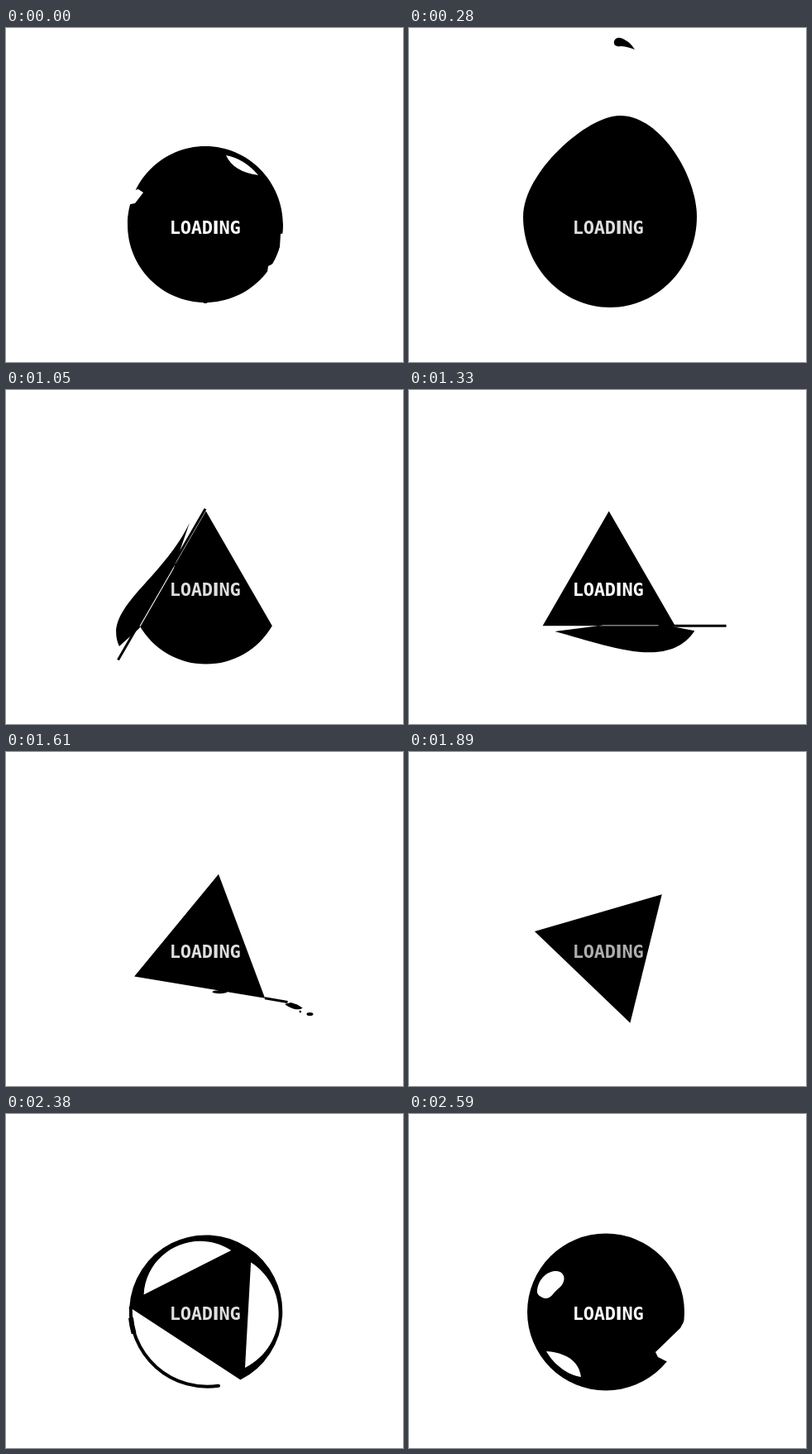
Write an HTML page that moves like this. It is 480 px wide and 404 px high and loops after 2.66 s.

```html
<!DOCTYPE html>
<html lang="en">
<head>
<meta charset="utf-8">
<title>Loading</title>
<style>
html, body { margin: 0; width: 100%; height: 100%; overflow: hidden; background: #fff; }
svg { display: block; width: 100vw; height: 100vh; }
text { font: bold 22px "DejaVu Sans Mono", monospace; letter-spacing: -.3px; }
.thin { font-family: "DejaVu Sans", sans-serif; }
</style>
</head>
<body>
<svg viewBox="0 0 480 404">
  <path id="ink"/>
  <path id="holes" fill="#fff"/>
  <path id="slash" fill="none" stroke="#000" stroke-width="3"/>
  <path id="arcs" fill="none" stroke="#000" stroke-width="4" stroke-linecap="round"/>
  <path id="clot" fill="none" stroke="#000" stroke-width="6"/>
  <path id="drop" d="M248 16C250 10 257 11 262 15Q268 18 273 26Q262 22 256 22C250 23 247 20 248 16Z"/>
  <text id="label" x="197.8" y="248.6">LOAD<tspan class="thin">I</tspan>NG</text>
</svg>
<script>
const LOOP = 2660, STEP = 70, CX = 241.7, CY = 239, R = 92.5;
const $ = id => document.getElementById(id);
const set = (id, d) => $(id).setAttribute('d', d);
const clamp = x => Math.max(0, Math.min(1, x));
const mix = (a, b, p) => a.map((v, i) => v + (b[i] - v) * p);
const xy = p => p.map(v => v.toFixed(1)).join(' ');
const polar = (deg, r = R) => {
  const a = deg * Math.PI / 180;
  return [CX + r * Math.sin(a), CY - r * Math.cos(a)];
};
const disc = (x, y, rx, ry = rx) =>
  `M${x - rx} ${y}a${rx} ${ry} 0 1 1 ${2 * rx} 0a${rx} ${ry} 0 1 1 ${-2 * rx} 0Z`;

// Interpolates rows of [time, ...values].
function keyed(rows, t) {
  let i = 0;
  while (i < rows.length - 2 && t > rows[i + 1][0]) i++;
  const [a, b] = [rows[i], rows[i + 1]];
  return mix(a, b, clamp((t - a[0]) / (b[0] - a[0]))).slice(1);
}

// Coordinates along (u) and outward from (v) a chord of the circle.
function chord(from, to, turn = 0) {
  const a = polar(from + turn), b = polar(to + turn);
  const len = Math.hypot(b[0] - a[0], b[1] - a[1]);
  const d = [(b[0] - a[0]) / len, (b[1] - a[1]) / len];
  const m = [(a[0] + b[0]) / 2 - CX, (a[1] + b[1]) / 2 - CY];
  const h = Math.hypot(...m);
  return (u, v) => [a[0] + d[0] * u + m[0] / h * v, a[1] + d[1] * u + m[1] / h * v];
}

// Sliced piece: start, two handles, end, two inner points, as u,v pairs.
const WHOLE = [0, 0, 36, 63, 127, 63, 163, 0, 120, 0, 60, 0];
const SLID = [22, 10, 100, 4, 165, 50, 194, 9, 163, -1, 80, -1];
const SPENT = [185, 3, 192, 7, 203, 9, 207, 4, 200, 1, 192, 0];

function piece(at, p, fall = 0) {
  if (p <= 0 || p > 2.4) return '';
  const s = p < 1 ? mix(WHOLE, SLID, p) : mix(SLID, SPENT, Math.min(1, p - 1));
  const drip = fall * Math.max(0, p - 1);
  const q = [0, 2, 4, 6, 8, 10].map(i => {
    const [x, y] = at(s[i], s[i + 1]);
    return xy([x, y + drip]);
  });
  return `M${q[0]}C${q[1]} ${q[2]} ${q[3]}L${q[4]}L${q[5]}Z`;
}

const line = (at, u0, u1, v = 0) => `M${xy(at(u0, v))}L${xy(at(u1, v))}`;

// Blob: top x, top y, side y, left, right, bottom, top handles, side handles.
const BLOB = [
  [0, 241, 143, 238, 147, 335, 332, 52, 52, 52, 52],
  [140, 251, 104, 234, 143, 341, 335, 34, 34, 50, 48],
  [280, 255, 106, 228, 138, 348, 338, 40, 50, 53, 48],
  [420, 248, 122, 234, 134, 350, 344, 52, 56, 58, 56],
  [560, 242, 131, 239, 132, 351, 347, 60, 60, 60, 60]
];
function blob(t) {
  const [x, y, s, l, r, b, hl, hr, vl, vr] = keyed(BLOB, t);
  const k = .552, mx = (l + r) / 2, dy = (b - s) * k;
  return `M${x} ${y}C${x + hr} ${y} ${r} ${s - vr} ${r} ${s}` +
    `C${r} ${s + dy} ${mx + (r - mx) * k} ${b} ${mx} ${b}` +
    `C${mx - (mx - l) * k} ${b} ${l} ${s + dy} ${l} ${s}` +
    `C${l} ${s - vl} ${x - hl} ${y} ${x} ${y}Z`;
}

// Offset of the flying drop and its scale.
const DROP = [[140, -8, 84, 1.3], [210, -5, 34, 1.2], [280, 0, 0, 1], [350, 6, 32, 1], [420, 8, 95, .9]];

// Circle whose three arcs can each be cut to a straight edge.
function body(turn, r, cuts) {
  let d = 'M' + xy(polar(turn, r));
  cuts.forEach((cut, i) => {
    d += (cut ? 'L' : `A${r} ${r} 0 0 1 `) + xy(polar(turn + 120 * (i + 1), r));
  });
  return d + 'Z';
}

const RIGHT = chord(0, 120), LEFT = chord(0, 240), BASE = chord(240, 120);

function slice(t, out) {
  const turn = t > 1400 ? 9.5 * ((t - 1400) / 210) ** 1.805 : 0;
  const r = 109 - (109 - R) * clamp((t - 630) / 210);
  out.ink = body(turn, r, [t >= 770, t >= 1260, t >= 980]);
  if (t >= 770) out.ink += piece(RIGHT, (t - 700) / 140, 30);
  if (t >= 980) out.ink += piece(LEFT, (t - 910) / 140, 20);
  const base = chord(240, 120, turn);
  if (t >= 1260) out.ink += piece(base, t < 1400 ? (t - 1190) / 210 : 1 + (t - 1400) / 210);

  const cuts = {
    630: [RIGHT, -65, 4], 700: [RIGHT, -100, 220], 770: [RIGHT, 150, 220],
    910: [LEFT, -60, 4], 980: [LEFT, -20, 205, 2], 1050: [LEFT, -2, 209, 2], 1120: [LEFT, 180, 214],
    1190: [BASE, -88, 20], 1260: [BASE, -20, 222], 1330: [BASE, 140, 222]
  };
  if (cuts[t]) out.slash = line(...cuts[t]);
  if (t >= 1540 && t <= 1680) {
    const far = (t - 1610) / 14;
    out.slash += line(base, 160, 188);
    out.ink += disc(...base(217 + far, 10), 4, 2) + disc(...base(205 + far, 9), 1.3) +
      disc(...base(105, 1.5), 9, 2);
  }
  if (t >= 1960) refill(t, turn, out);
}

// Arcs trail behind each corner, then the space under them floods.
const FLOOD = [[240, 1960, 345], [360, 2190, 140], [120, 2260, 140]];
function refill(t, turn, out) {
  for (const [corner, start, span] of FLOOD) {
    const p = (t - start) / span, head = corner + turn;
    if (p <= 0) continue;
    const arc = (a, b) =>
      `M${xy(polar(head - a, R - 1.5))}A${R} ${R} 0 0 0 ${xy(polar(head - b, R - 1.5))}`;
    if (p < 1) {
      out.arcs += arc(0, 120 * p);
      if (p > .4) out.clot += arc(8, 20);
      continue;
    }
    out.ink += `M${xy(polar(head - 120))}A${R} ${R} 0 0 1 ${xy(polar(head))}Z`;
    const size = .9 - .65 * clamp((t - start - span) / 280);
    const at = chord(corner - 120, corner, turn);
    const q = [0, 2, 4, 6].map(i =>
      xy(at(81.5 + (WHOLE[i] - 81.5) * size, 22 + (WHOLE[i + 1] - 22) * size)));
    out.holes += `M${q[0]}C${q[1]} ${q[2]} ${q[3]}Z`;
  }
}

function draw(t) {
  const out = { ink: '', holes: '', slash: '', arcs: '', clot: '' };
  if (t < 630) {
    out.ink = blob(t);
    if (t < STEP) {
      out.holes = 'M266 154Q288 158 305 178Q275 174 266 154Z' +
        'M148 198L160 195L166 199L156 212L146 214Z' +
        'M337 248L332 249L331 265L327 283L317 288L316 295L334 290Z';
      out.ink += disc(241, 331, 3, 2);
    }
  } else if (t < 2590) {
    slice(t, out);
  } else {
    out.ink = disc(238, 239.5, 95);
    out.holes = 'M155 213C157 198 168 190 178 190C190 191 190 203 182 210C174 216 172 224 164 223C158 221 154 218 155 213Z' +
      'M166 287C180 288 205 293 208 318C192 316 175 303 166 287Z' +
      'M335 246L328 259L298 288L301 294L311 299L340 300Z';
  }
  for (const id in out) set(id, out[id]);

  const flying = t >= 140 && t <= 420, [dx, dy, s] = keyed(DROP, t);
  $('drop').setAttribute('visibility', flying ? 'visible' : 'hidden');
  $('drop').setAttribute('transform', `translate(${260 + dx} ${18 + dy}) scale(${s}) translate(-260 -18)`);

  const g = Math.round(255 * (.83 + .17 * Math.cos(2 * Math.PI * t / 1330)));
  $('label').setAttribute('fill', `rgb(${g},${g},${g})`);
}

const begin = performance.now();
function tick() {
  const t = (performance.now() - begin) % LOOP;
  draw(Math.floor(t / STEP) * STEP);
  requestAnimationFrame(tick);
}
tick();
</script>
</body>
</html>
```
